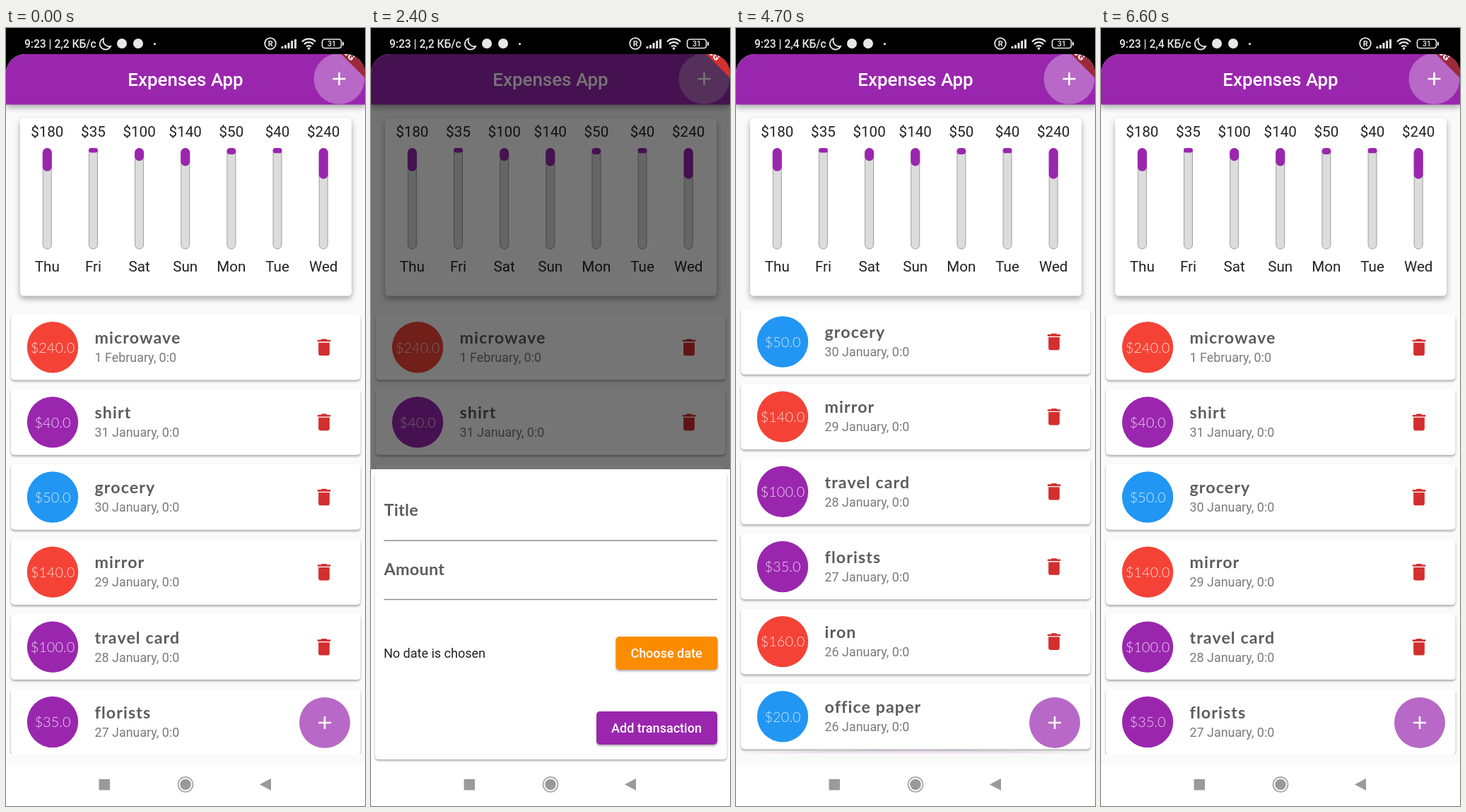
An HTML page that plays this animation: 508 by 1102 pixels, repeating every 6.7 s.

```html
<!DOCTYPE html>
<html lang="en">
<head>
<meta charset="utf-8">
<title>Expenses App</title>
<style>
html, body { margin: 0; width: 100%; height: 100%; overflow: hidden; background: #000; }
svg { display: block; width: 100vw; height: 100vh; }
text { font-family: Roboto, "Noto Sans", sans-serif; font-size: 18px; }
.mid { text-anchor: middle; }
.chart { font-size: 20.6px; fill: #222; }
.name { font: 700 23.2px Lato, sans-serif; letter-spacing: 1.1px; fill: #5c5c5c; }
.label { letter-spacing: .4px; }
.date { font-size: 17.9px; fill: #7a7a7a; }
.sum { font: 300 20px Lato, sans-serif; fill: #fff; fill-opacity: .8; }
.btn { font-weight: 500; fill: #fff; }
.low { filter: drop-shadow(0 2px 1.5px #0005); }
.high { filter: drop-shadow(0 4px 4px #0005); }
</style>
</head>
<body>
<svg viewBox="0 0 508 1102" preserveAspectRatio="none">
  <defs>
    <clipPath id="screen"><path d="M0 1042V64a27 27 0 0 1 27-27H481a27 27 0 0 1 27 27V1042z"/></clipPath>
    <clipPath id="window"><rect y="399" width="508" height="629"/></clipPath>
    <path id="bin" fill="#d32f2f" d="M6 19c0 1.1.9 2 2 2h8c1.1 0 2-.9 2-2V7H6v12zM19 4h-3.5l-1-1h-5l-1 1H5v2h14V4z"/>
    <g id="add">
      <circle r="36" fill="#b868c6"/>
      <path d="M-9 0H9M0-9V9" stroke="#fff" stroke-width="2.6"/>
    </g>
  </defs>

  <rect width="508" height="1102"/>
  <g fill="#e8e8e8">
    <text id="status" x="26" y="28" style="font-size:15.6px;font-weight:500"></text>
    <path d="M138 15a8 8 0 1 0 10 11a8.5 8.5 0 0 1-10-11z" fill="none" stroke="#e8e8e8" stroke-width="1.8"/>
    <circle cx="164" cy="22" r="7"/>
    <circle cx="187" cy="22" r="7"/>
    <circle cx="210.5" cy="22.5" r="1.6"/>
    <circle cx="374" cy="22" r="7.8" fill="none" stroke="#e8e8e8" stroke-width="1.8"/>
    <text class="mid" x="374.2" y="26" style="font-size:11px;font-weight:700">R</text>
    <path d="M391 29v-3M395.5 29v-5M400 29v-8M404.7 29v-11M409.5 29v-13" stroke="#e8e8e8" stroke-width="3"/>
    <g fill="none" stroke="#e8e8e8" stroke-width="2.3">
      <path d="M419 19.5a13 13 0 0 1 19 0M422 23a9 9 0 0 1 13 0M425 26.5a5 5 0 0 1 7 0"/>
      <rect x="447.5" y="16" width="27" height="12.5" rx="3.5" stroke-width="1.7"/>
    </g>
    <circle cx="428.5" cy="29" r="1.8"/>
    <rect x="476" y="19.5" width="2" height="5.5" rx="1"/>
    <text class="mid" x="461" y="26" style="font-size:10.5px;font-weight:500">31</text>
  </g>

  <g clip-path="url(#screen)">
    <rect y="37" width="508" height="1005" fill="#fafafa"/>
    <g clip-path="url(#window)">
      <g id="list"></g>
      <path id="glow" d="M0 1028Q254 1018 508 1028z" fill="#9c27b0" fill-opacity=".09"/>
    </g>
    <rect class="high" x="20" y="127.5" width="469" height="252" rx="5" fill="#fff"/>
    <g id="chart"></g>
    <rect class="high" y="37" width="508" height="71.5" fill="#9a26ae"/>
    <text class="mid" x="254" y="82" fill="#fff" style="font-size:25.9px;font-weight:500">Expenses App</text>
    <use href="#add" x="471.5" y="72"/>
    <use href="#add" x="451" y="984"/>
    <rect id="shade" y="37" width="508" height="1005"/>

    <g id="sheet">
      <rect y="625" width="508" height="480" fill="#fff"/>
      <rect class="low" x="5.5" y="629" width="498" height="407" rx="5" fill="#fff"/>
      <text class="name label" x="18.5" y="691">Title</text>
      <text class="name label" x="18.5" y="774.5">Amount</text>
      <path d="M18 726H490M18 809.5H490" stroke="#8e8e8e" stroke-width="1.3"/>
      <text x="18" y="891.5" fill="#222">No date is chosen</text>
      <rect class="low" x="346.5" y="862" width="144" height="47" rx="5" fill="#fb8c00"/>
      <text class="btn mid" x="418" y="891.5">Choose date</text>
      <rect class="low" x="319" y="968" width="171" height="47" rx="5" fill="#9a26ae"/>
      <text class="btn mid" x="404" y="998">Add transaction</text>
    </g>

    <g transform="translate(508 -2) rotate(45)">
      <rect id="ribbon" x="-52" y="36" width="104" height="15.5"/>
      <text class="mid" y="48.5" fill="#fff" style="font-size:13px;font-weight:900">DEBUG</text>
    </g>
  </g>

  <rect y="1042" width="508" height="60" fill="#fff"/>
  <g fill="#9a9a9a">
    <rect x="131.5" y="1064" width="15.5" height="15.5"/>
    <circle cx="254" cy="1071.5" r="7.8"/>
    <circle cx="254" cy="1071.5" r="10.5" fill="none" stroke="#9a9a9a" stroke-width="1.5"/>
    <path d="M359 1071.5L375 1063V1080z"/>
  </g>
</svg>
<script>
const $ = id => document.getElementById(id);
const RED = '#f44336', PURPLE = '#9a26ae', BLUE = '#2196f3';

const days = [['Thu', 180], ['Fri', 35], ['Sat', 100], ['Sun', 140], ['Mon', 50], ['Tue', 40], ['Wed', 240]];
const total = days.reduce((sum, day) => sum + day[1], 0);
$('chart').innerHTML = days.map(([day, cost], i) => {
  const x = 58.3 + 65.15 * i, h = 143 * cost / total;
  return `<text class="chart mid" x="${x}" y="153.5">$${cost}</text>
    <rect x="${x - 6}" y="170.5" width="12" height="142.5" rx="6" fill="#dcdcdc" stroke="#9e9e9e"/>
    <rect x="${x - 6.5}" y="170" width="13" height="${h}" rx="${Math.min(6.5, h / 2)}" fill="${PURPLE}"/>
    <text class="chart mid" x="${x}" y="345">${day}</text>`;
}).join('');

const items = [
  ['microwave', 240, '1 February', RED], ['shirt', 40, '31 January', PURPLE],
  ['grocery', 50, '30 January', BLUE], ['mirror', 140, '29 January', RED],
  ['travel card', 100, '28 January', PURPLE], ['florists', 35, '27 January', PURPLE],
  ['iron', 160, '26 January', RED], ['office paper', 20, '26 January', BLUE]
];
$('list').innerHTML = items.map(([name, cost, date, color], i) =>
  `<g transform="translate(0 ${405.5 + 106.15 * i})">
    <rect class="low" x="7" width="494.5" height="93" rx="5" fill="#fff"/>
    <circle cx="66" cy="46.7" r="36.2" fill="${color}"/>
    <text class="sum mid" x="66" y="54">$${cost}.0</text>
    <text class="name" x="125.5" y="41.5">${name}</text>
    <text class="date" x="125.5" y="67.5">${date}, 0:0</text>
    <use href="#bin" transform="translate(434.3 31) scale(1.31)"/>
  </g>`).join('');

const ramp = (t, from, to) => Math.min(1, Math.max(0, (t - from) / (to - from)));
const smooth = p => p * p * (3 - 2 * p);

function draw(t) {
  const open = (1 - (1 - ramp(t, 1387, 1637)) ** 2) * (1 - ramp(t, 2880, 3080) ** 2);
  $('sheet').setAttribute('transform', `translate(0 ${417 * (1 - open)})`);
  $('shade').setAttribute('opacity', .54 * Math.min(1, open * 1.03));
  $('ribbon').setAttribute('fill', open > .5 ? '#d32f2f' : '#9c2a3a');

  const scroll = 220 * (smooth(ramp(t, 3850, 4350)) - smooth(ramp(t, 4800, 5308)));
  $('list').setAttribute('transform', `translate(0 ${-scroll})`);
  $('glow').setAttribute('opacity', ramp(t, 4300, 4500) * (1 - ramp(t, 4700, 4900)));
  $('status').textContent = `9:23 | 2,${t < 3700 ? 2 : 4} КБ/с`;
}

const start = performance.now();
function tick(now) {
  draw(Math.floor(Math.max(0, now - start) % 6700 / 100) * 100);
  requestAnimationFrame(tick);
}
draw(0);
requestAnimationFrame(tick);
</script>
</body>
</html>
```
